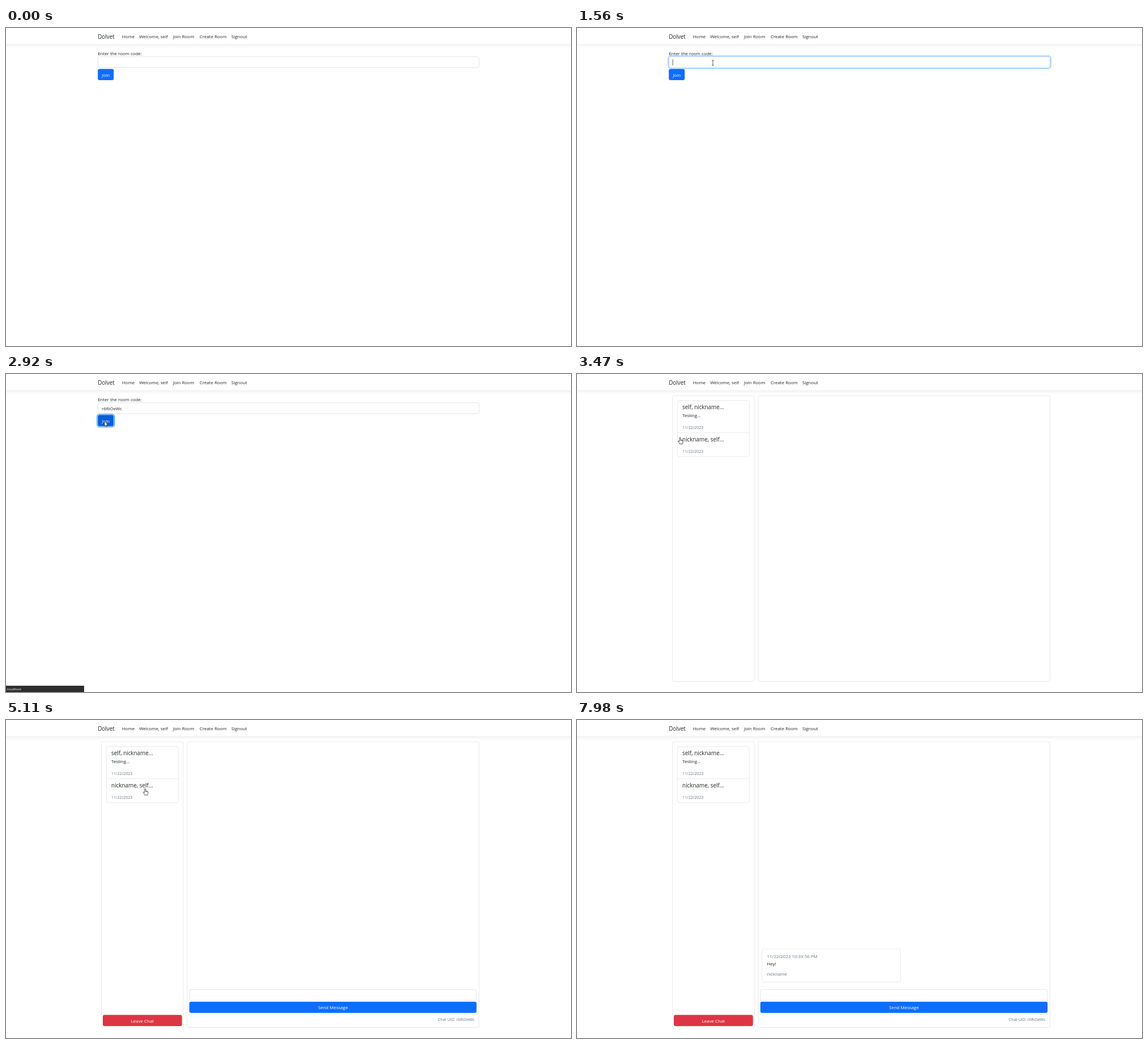
Write an HTML page that moves like this. It is 998 px wide and 561 px high and loops after 8000 ms.

```html
<!DOCTYPE html>
<html lang="en">
<head>
<meta charset="utf-8">
<title>Join a chat room</title>
<style>
html, body { margin: 0; width: 100%; height: 100%; overflow: hidden; background: #fff; }
svg { display: block; width: 100vw; height: 100vh; }
text { font: 15.2px "Open Sans", "Noto Sans", sans-serif; fill: #212529; white-space: pre; }
.big { font-size: 19px; }
.small { font-size: 13.5px; }
.muted { fill: #6c757d; }
.light { fill: #fff; text-anchor: middle; }
.end { text-anchor: end; }
.bar { fill: #fff; filter: drop-shadow(0 4px 6px rgba(0, 0, 0, .06)); }
.box { fill: #fff; stroke: #d8dce0; stroke-width: 1.2; }
.field { fill: #fff; stroke: #ced4da; stroke-width: 1.2; }
.blue { fill: #0d6efd; }
.red { fill: #dc3545; }
.ring { fill: none; stroke: #258cfb; stroke-width: 0; }
.gap { fill: none; stroke: #fff; stroke-width: 3.2; }

.k { animation: 8s step-end infinite; }
.join { animation-name: join; }
.chat { animation-name: chat; }
.form { animation-name: form; }
.msg { animation-name: msg; }
.code { animation-name: code; }
.caret { animation-name: caret; }
.status { animation-name: status; }
.in-ring { animation-name: in-ring; }
.in-edge { animation-name: in-edge; }
.btn-ring { animation-name: btn-ring; }
.btn { animation-name: btn; }
.pointer { animation-name: move; }
.arrow { animation-name: arrow; }
.hand { animation-name: hand; }
.beam { animation-name: beam; }

@keyframes join { 0% { opacity: 1 } 37.625% { opacity: 0 } }
@keyframes chat { 0% { opacity: 0 } 37.625% { opacity: 1 } }
@keyframes form { 0% { opacity: 0 } 63.875% { opacity: 1 } }
@keyframes msg { 0% { opacity: 0 } 99.75% { opacity: 1 } }
@keyframes code { 0% { opacity: 0 } 20.625% { opacity: 1 } }
@keyframes status { 0%, 37.625% { opacity: 0 } 36.5% { opacity: 1 } }
@keyframes caret {
  0% { opacity: 0; transform: none }
  18.375% { opacity: 1; transform: none }
  20.625%, 31.875% { opacity: 1; transform: translateX(71px) }
  26.375%, 35.375% { opacity: 0; transform: translateX(71px) }
}
@keyframes in-ring {
  0%, 36.5% { stroke-width: 0 }
  18.375%, 35.375% { stroke-width: 3.5px; stroke-opacity: .5 }
  19.5% { stroke-width: 6.4px; stroke-opacity: .8 }
  20.625% { stroke-width: 8px; stroke-opacity: 1 }
}
@keyframes in-edge {
  0%, 36.5% { stroke: #ced4da }
  18.375%, 35.375% { stroke: #aac6ec }
  19.5% { stroke: #86b7fe }
}
@keyframes btn-ring {
  0% { stroke-width: 0 }
  35.375% { stroke-width: 5px; stroke-opacity: .7 }
  36.5% { stroke-width: 8px; stroke-opacity: 1 }
}
@keyframes btn {
  0% { fill: #0d6efd }
  28.625% { fill: #0c66ea }
  29.625% { fill: #0b5ed7 }
  35.375% { fill: #0a58ca }
  36.5% { fill: #0b5ed7 }
}

/* pointer path, in stage pixels */
@keyframes move {
  0%, 7.125% { transform: translate(949px, 176px) }
  8.25% { transform: translate(838px, 164px) }
  9.375% { transform: translate(672px, 141px) }
  10.5% { transform: translate(510px, 115px) }
  11.625% { transform: translate(382px, 93px) }
  12.75% { transform: translate(298px, 75px) }
  13.75% { transform: translate(254px, 64px) }
  14.875% { transform: translate(240px, 61.5px) }
  22.875% { transform: translate(228px, 66px) }
  24.125% { transform: translate(208px, 81px) }
  25.25% { transform: translate(192px, 94px) }
  26.375% { transform: translate(182px, 100px) }
  27.5% { transform: translate(177px, 93px) }
  28.625% { transform: translate(176.5px, 87px) }
  29.625% { transform: translate(175.5px, 83.7px) }
  36.5% { transform: translate(174px, 83.3px) }
  42.25% { transform: translate(175px, 94px) }
  43.375% { transform: translate(182px, 112px) }
  44.5% { transform: translate(192px, 130px) }
  45.625% { transform: translate(203px, 145px) }
  46.75% { transform: translate(213px, 156px) }
  47.875% { transform: translate(222px, 155px) }
  49% { transform: translate(229px, 150px) }
  50.125% { transform: translate(235px, 142px) }
  51.25% { transform: translate(240px, 132px) }
  52.375% { transform: translate(243px, 125px) }
  53.5% { transform: translate(245.7px, 121px) }
  68.5% { transform: translate(342px, 130px) }
  69.625% { transform: translate(557px, 140px) }
}
@keyframes arrow {
  0%, 13.75%, 28.625%, 43.375%, 50.125%, 70.75% { opacity: 0 }
  7.125%, 24.125%, 36.5%, 46.75%, 68.5% { opacity: 1 }
}
@keyframes hand {
  0%, 36.5%, 46.75%, 68.5% { opacity: 0 }
  28.625%, 43.375%, 50.125% { opacity: 1 }
}
@keyframes beam {
  0%, 24.125% { opacity: 0 }
  13.75% { opacity: 1 }
}
</style>
</head>
<body>
<svg viewBox="0 0 1920 1079.28" preserveAspectRatio="none">
  <rect class="bar" x="-40" y="-20" width="2000" height="76"/>
  <path d="M0 56.5H1920" stroke="#dee2e6"/>
  <text class="big" x="312" y="36.3">Dolvet</text>
  <text x="394" y="34.8">Home</text>
  <text x="452.5" y="34.8">Welcome, self</text>
  <text x="567.5" y="34.8">Join Room</text>
  <text x="658" y="34.8">Create Room</text>
  <text x="765.5" y="34.8">Signout</text>

  <g class="k join">
    <text x="312" y="91.6">Enter the room code:</text>
    <rect class="k ring in-ring" x="312" y="97" width="1296" height="38" rx="6"/>
    <rect class="gap" x="312" y="97" width="1296" height="38" rx="6"/>
    <rect class="k field in-edge" x="312.5" y="97.5" width="1295" height="37" rx="5.5"/>
    <text class="k code" x="325" y="122.6">r6RiOeWc</text>
    <path class="k caret" d="M325.5 106V127" stroke="#212529" stroke-width="1.5"/>
    <rect class="k ring btn-ring" x="312" y="139" width="54" height="38" rx="6"/>
    <rect class="gap" x="312" y="139" width="54" height="38" rx="6"/>
    <rect class="k blue btn" x="312" y="139" width="54" height="38" rx="6"/>
    <text class="light" x="339" y="164.8">Join</text>
  </g>

  <g class="k status">
    <rect y="1058" width="264" height="22" fill="#2d2d2d"/>
    <text x="4" y="1074" style="font-size:11.4px;fill:#fff">localhost</text>
  </g>

  <g class="k chat">
    <rect class="box" x="324.5" y="73.5" width="278" height="970" rx="6"/>
    <rect class="box" x="615.5" y="73.5" width="992" height="970" rx="6"/>
    <rect class="box" x="341.5" y="90" width="244" height="190.5" rx="6"/>
    <path class="box" d="M341.5 199H585.5"/>
    <text class="big" x="358" y="119.5">self, nickname...</text>
    <text x="358" y="145.6">Testing...</text>
    <text class="small muted" x="358" y="185.8">11/22/2023</text>
    <text class="big" x="358" y="228.5">nickname, self...</text>
    <text class="small muted" x="358" y="266.5">11/22/2023</text>
  </g>

  <g class="k form">
    <rect class="red" x="329" y="1001" width="269" height="38" rx="6"/>
    <text class="light" x="463.5" y="1026.8">Leave Chat</text>
    <rect class="field" x="623.5" y="914.5" width="975" height="37" rx="5.5"/>
    <rect class="blue" x="623" y="956" width="976" height="38" rx="6"/>
    <text class="light" x="1111" y="981.8">Send Message</text>
    <text class="small muted end" x="1592" y="1022">Chat UID: r6RiOeWc</text>
  </g>

  <g class="k msg">
    <rect class="box" x="628.5" y="777" width="471" height="112.5" rx="6"/>
    <text class="muted" x="645.5" y="808.6">11/22/2023 10:39:56 PM</text>
    <text x="645.5" y="832.6">Hey!</text>
    <text class="muted" x="645.5" y="868.5">nickname</text>
  </g>

  <g transform="scale(1.9238)" fill="#fff" stroke="#111" stroke-width=".7" stroke-linejoin="round">
    <g class="k pointer">
      <path class="k arrow" d="M0 0V8.8L2 6.9L3.3 9.9L4.7 9.3L3.4 6.4H6.1Z"/>
      <g class="k hand">
        <path d="M-1 1a1 1 0 0 1 2 0V4.2L4 4.9Q5.3 5.3 5.2 6.5L4.8 9.2Q4.6 10.2 4.2 11.5H-.6Q-1 10-3.2 7.2Q-3.8 6-2.6 6L-1 7.2Z"/>
        <path d="M1 4V6M2.5 4.5V6.2M3.9 5V6.4" stroke-width=".5"/>
      </g>
      <path class="k beam" fill="none" d="M-1.8-4.3H1.8M0-4.3V4.3M-1.8 4.3H1.8"/>
    </g>
  </g>
</svg>
</body>
</html>
```
